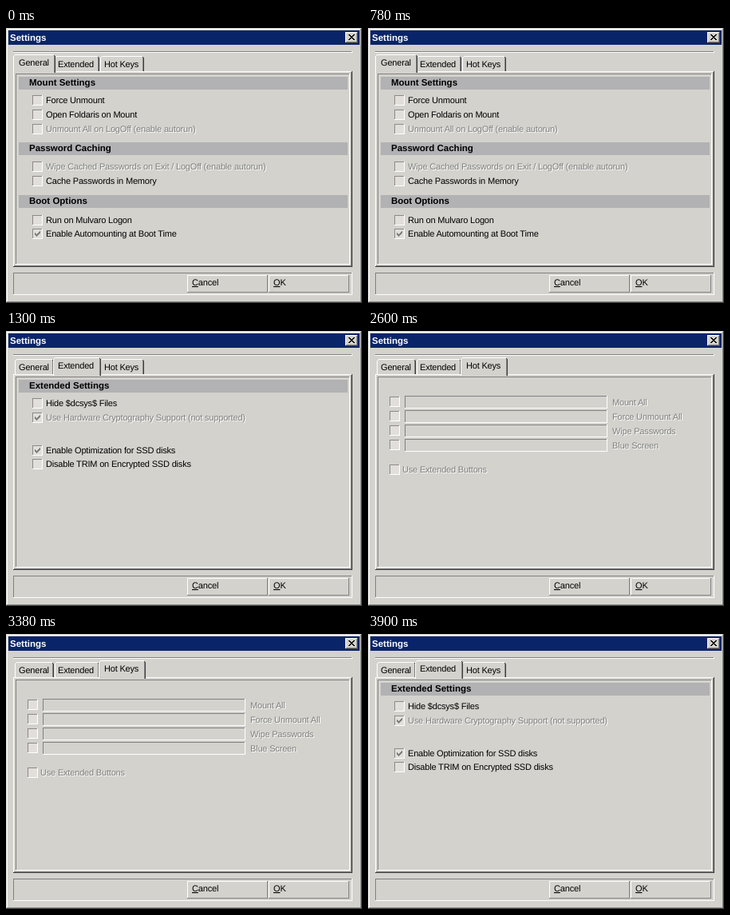
An HTML page for the animation above (5.2 s loop, 446 px wide and 344 px high).

```html
<!DOCTYPE html>
<html lang="en">
<head>
<meta charset="utf-8">
<title>Settings</title>
<style>
  html, body { margin: 0; width: 100%; height: 100%; overflow: hidden; background: #d3d2cd; }
  svg { display: block; shape-rendering: crispEdges; }
  text {
    font: 11px "Liberation Sans", Arial, sans-serif;
    letter-spacing: -0.18px;
    text-rendering: geometricPrecision;
    white-space: pre;
  }
  .bold { font-weight: bold; font-size: 11.5px; letter-spacing: 0; }
  .general, .extended, .hotkeys { animation: 5200ms step-end infinite; }
  .general { animation-name: general; }
  .extended { animation-name: extended; }
  .hotkeys { animation-name: hotkeys; }
  @keyframes general { 0% { visibility: visible; } 25%, 100% { visibility: hidden; } }
  @keyframes extended {
    0% { visibility: hidden; }
    25% { visibility: visible; }
    50% { visibility: hidden; }
    75%, 100% { visibility: visible; }
  }
  @keyframes hotkeys {
    0% { visibility: hidden; }
    50% { visibility: visible; }
    75%, 100% { visibility: hidden; }
  }
</style>
</head>
<body>
<svg id="stage" width="446" height="344" viewBox="0 0 446 344"></svg>
<script>
const FACE = '#d3d2cd', LIGHT = '#fff', SHADE = '#808080', DARK = '#404040';

const rect = (x, y, w, h, fill) =>
  `<rect x="${x}" y="${y}" width="${w}" height="${h}" fill="${fill}"/>`;

// One-pixel bevel: top and left in one colour, bottom and right in the other
const bevel = (x, y, w, h, tl, br) =>
  rect(x, y, w, 1, tl) + rect(x, y, 1, h, tl) +
  rect(x, y + h - 1, w, 1, br) + rect(x + w - 1, y, 1, h, br);

const text = (x, y, label, fill = '#000', cls = '') =>
  `<text x="${x}" y="${y}" fill="${fill}" class="${cls}">${label}</text>`;

const dimText = (x, y, label) =>
  text(x + 1, y + 1, label, LIGHT) + text(x, y, label, SHADE);

function tick(x, y) {
  let out = '';
  for (let i = 0; i < 7; i++) {
    out += rect(x + 3 + i, y + 3 + (i < 3 ? i + 2 : 6 - i), 1, 3, SHADE);
  }
  return out;
}

function cross(x, y) {
  let out = '';
  for (let i = 0; i < 7; i++) {
    out += rect(x + i, y + i, 2, 1, '#000') + rect(x + 6 - i, y + i, 2, 1, '#000');
  }
  return out;
}

const box = (x, y, checked) =>
  rect(x, y, 13, 13, '#e2dfdb') + bevel(x, y, 13, 13, '#8c8a88', LIGHT) +
  (checked ? tick(x, y) : '');

const option = (y, label, { checked = false, dim = false, x = 33, gap = 17 } = {}) =>
  box(x, y, checked) + (dim ? dimText : text)(x + gap, y + 10, label);

const heading = (y, label) =>
  rect(16, y, 412, 16, '#b2b1b3') + text(29, y + 11, label, '#000', 'bold');

const tabs = [
  { label: 'General', x: 11, w: 49, tx: 16 },
  { label: 'Extended', x: 61, w: 56, tx: 65 },
  { label: 'Hot Keys', x: 118, w: 55, tx: 123 }
];

function tab({ label, x, w, tx }, active) {
  const grow = active ? 2 : 0;
  const l = x - grow, r = x + w + grow, top = 35 - grow;
  const h = (active ? 56 : 54) - top;
  return rect(l + 1, top + 1, r - l - 2, h - 1, FACE) +
    rect(l + 2, top, r - l - 4, 1, LIGHT) +
    rect(l + 1, top + 1, 1, 1, LIGHT) +
    rect(l, top + 2, 1, h - 2, LIGHT) +
    rect(r - 2, top + 2, 1, h - 2, SHADE) +
    rect(r - 2, top + 1, 1, 1, DARK) +
    rect(r - 1, top + 2, 1, h - 2, DARK) +
    text(tx, active ? 47 : 49, label);
}

function page(cls, active, content) {
  const rest = tabs.filter((t, i) => i !== active).map(t => tab(t, false)).join('');
  return `<g class="${cls}">${rest}${tab(tabs[active], true)}${content}</g>`;
}

const button = (x, label) =>
  bevel(x, 309, 101, 22, LIGHT, SHADE) +
  text(x + 6, 322, `<tspan text-decoration="underline">${label[0]}</tspan>${label.slice(1)}`);

const frame =
  rect(0, 0, 446, 344, FACE) +
  bevel(0, 0, 446, 344, FACE, DARK) +
  bevel(1, 1, 444, 342, LIGHT, SHADE) +
  rect(3, 3, 440, 18, '#0a246a') +
  text(5, 16, 'Settings', LIGHT, 'bold') +
  rect(425, 5, 16, 14, FACE) +
  bevel(425, 5, 16, 14, LIGHT, DARK) +
  bevel(426, 6, 14, 12, FACE, SHADE) +
  cross(429, 8) +
  bevel(9, 29, 425, 2, SHADE, LIGHT) +
  bevel(9, 54, 425, 245, LIGHT, DARK) +
  bevel(10, 55, 423, 243, FACE, SHADE) +
  bevel(12, 57, 419, 239, SHADE, LIGHT) +
  bevel(9, 306, 425, 28, SHADE, LIGHT) +
  button(227, 'Cancel') +
  button(329, 'OK');

const general =
  heading(61, 'Mount Settings') +
  option(84, 'Force Unmount') +
  option(102, 'Open Foldaris on Mount') +
  option(120, 'Unmount All on LogOff (enable autorun)', { dim: true }) +
  heading(143, 'Password Caching') +
  option(167, 'Wipe Cached Passwords on Exit / LogOff (enable autorun)', { dim: true }) +
  option(185, 'Cache Passwords in Memory') +
  heading(209, 'Boot Options') +
  option(234, 'Run on Mulvaro Logon') +
  option(251, 'Enable Automounting at Boot Time', { checked: true });

const extended =
  heading(61, 'Extended Settings') +
  option(84, 'Hide $dcsys$ Files') +
  option(102, 'Use Hardware Cryptography Support (not supported)', { checked: true, dim: true }) +
  option(143, 'Enable Optimization for SSD disks', { checked: true }) +
  option(160, 'Disable TRIM on Encrypted SSD disks');

const hotkeys =
  ['Mount All', 'Force Unmount All', 'Wipe Passwords', 'Blue Screen'].map((label, i) => {
    const y = 82 + i * 18;
    return box(27, y) + bevel(46, y - 1, 254, 16, SHADE, LIGHT) + dimText(306, y + 11, label);
  }).join('') +
  option(167, 'Use Extended Buttons', { dim: true, x: 27, gap: 16 });

document.getElementById('stage').innerHTML = frame +
  page('general', 0, general) +
  page('extended', 1, extended) +
  page('hotkeys', 2, hotkeys);
</script>
</body>
</html>
```
